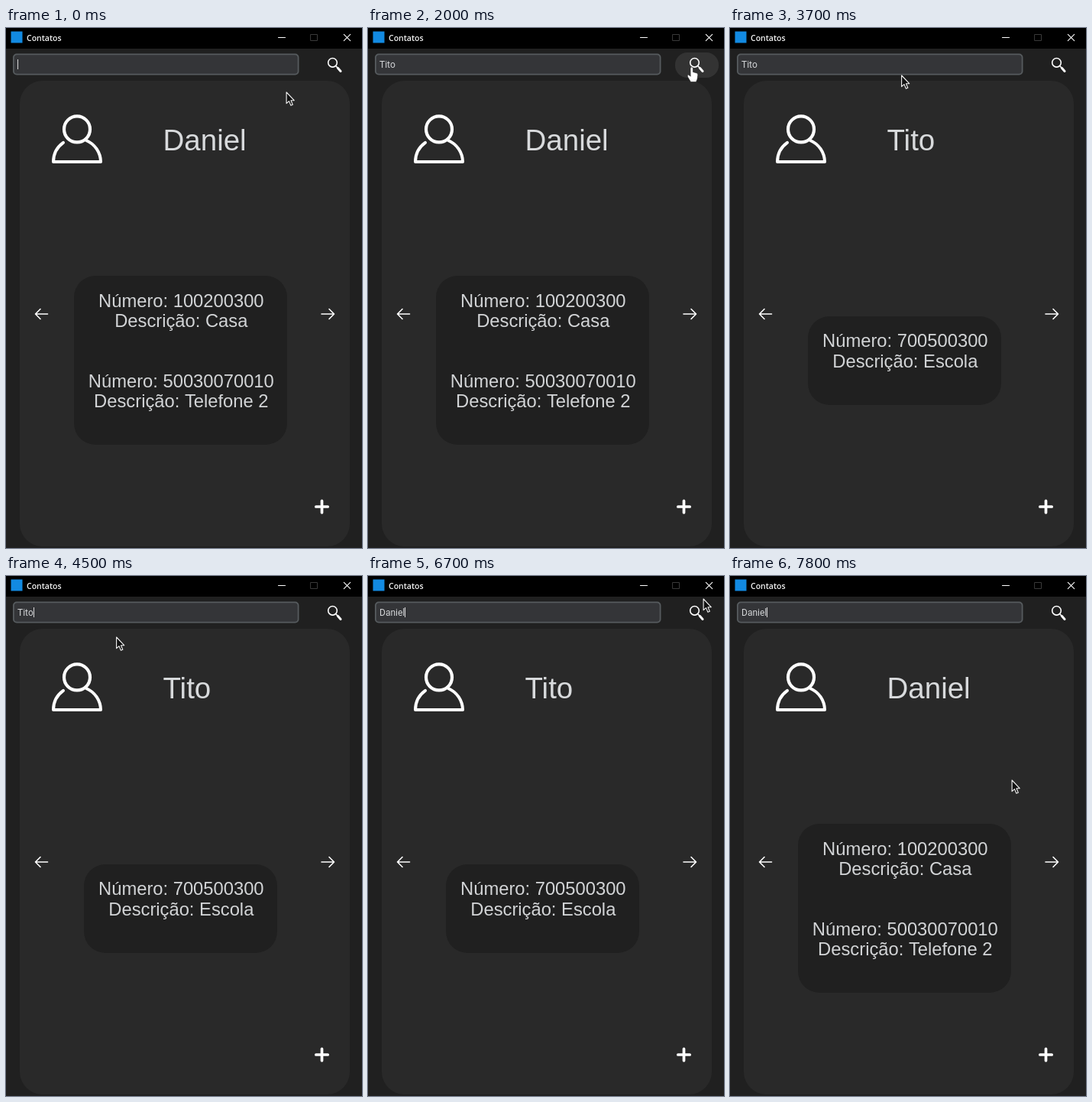
Animation, 466 px wide and 680 px high, one loop 8000 ms. Source, as an HTML page with a canvas:

```html
<!DOCTYPE html>
<html lang="pt">
<head>
<meta charset="utf-8">
<title>Contatos</title>
<style>
html, body { margin: 0; width: 100%; height: 100%; overflow: hidden; background: #202020; }
canvas { display: block; }
</style>
</head>
<body>
<canvas id="stage" width="466" height="680"></canvas>
<script>
const ctx = document.getElementById('stage').getContext('2d');
const LOOP = 8000;
const SANS = '"Liberation Sans", Arial, sans-serif';

const daniel = {
  name: 'Daniel', box: [89, 324, 279, 221], top: 364.6,
  phones: [['100200300', 'Casa'], ['50030070010', 'Telefone 2']]
};
const tito = {
  name: 'Tito', box: [102, 377, 253, 116], top: 417.2,
  phones: [['700500300', 'Escola']]
};

// [time, value]: the last entry reached is shown
const typing = [
  [0, ''], [300, 'T'], [700, 'Ti'], [1200, 'Tit'], [1400, 'Tito'],
  [4800, 'Tit'], [4860, 'Ti'], [4930, 'T'], [5000, ''],
  [5200, 'D'], [5300, 'Da'], [5600, 'Dan'], [5800, 'Dani'], [6000, 'Danie'], [6200, 'Daniel']
];
const contacts = [[0, daniel], [2200, tito], [7300, daniel]];

// [time, x, y] of the pointer tip
const path = [
  [0, 366, 83], [1300, 366, 83], [1800, 424, 51], [2600, 424, 51], [2900, 398, 84],
  [3600, 223.5, 61], [3900, 223.5, 61], [4500, 143.5, 79], [6500, 143.5, 79],
  [6700, 438, 29], [6900, 424, 51], [7400, 424, 51], [7800, 368, 266], [LOOP, 368, 266]
];

function current(list, t) {
  let value = list[0][1];
  for (const [at, v] of list) if (t >= at) value = v;
  return value;
}

function pointerAt(t) {
  const i = Math.max(1, path.findIndex(p => p[0] > t));
  const [t0, x0, y0] = path[i - 1], [t1, x1, y1] = path[i];
  const u = (t - t0) / (t1 - t0), k = u * u * (3 - 2 * u);
  return [x0 + (x1 - x0) * k, y0 + (y1 - y0) * k];
}

function panel(x, y, w, h, r, fill) {
  ctx.fillStyle = fill;
  ctx.beginPath();
  ctx.roundRect(x, y, w, h, r);
  ctx.fill();
}

function line(d, width, color = '#fff') {
  ctx.strokeStyle = color;
  ctx.lineWidth = width;
  ctx.stroke(new Path2D(d));
}

function circle(x, y, r, width) {
  ctx.strokeStyle = '#fff';
  ctx.lineWidth = width;
  ctx.beginPath();
  ctx.arc(x, y, r, 0, 2 * Math.PI);
  ctx.stroke();
}

function text(s, x, y, font, color, align = 'left') {
  ctx.font = font;
  ctx.fillStyle = color;
  ctx.textAlign = align;
  ctx.fillText(s, x, y);
}

function titleBar() {
  ctx.fillStyle = '#000';
  ctx.fillRect(0, 0, 466, 27);
  ctx.fillStyle = '#128ae2';
  ctx.fillRect(6.5, 4.5, 15, 15);
  text('Contatos', 27, 17, '600 10.5px "Open Sans", "Noto Sans", sans-serif', '#f2f2f2');
  line('M356.5 12.5H365.5', 1.1);
  line('M399 8.5H407.5V16.5H399Z', 1, '#3a3a3a');
  line('M442.3 8.3L450.7 16.7M450.7 8.3L442.3 16.7', 1.1);
}

function searchBar(t, hover) {
  panel(9, 33.5, 374.5, 28, 5, '#565b5e');
  panel(10.8, 35.2, 370.9, 24.6, 3.5, '#343538');
  const typed = current(typing, t);
  text(typed, 15, 51.5, '12px Roboto, sans-serif', '#d2d4d6');
  // caret: 600 ms on, 300 ms off
  if ((t + 500) % 900 < 600) {
    const w = ctx.measureText(typed).width;
    ctx.fillStyle = '#d8d8d8';
    ctx.fillRect(Math.round(15 + w), 41, 1, 13);
  }
  if (hover) panel(402, 32, 57, 33, 16, '#333');
  circle(427.5, 45.3, 5.8, 1.6);
  line('M431.6 49.5L434 52', 1.6);
  line('M434.3 52.3L438 56.5', 3);
}

function card(c) {
  panel(18, 69, 432, 609, 30, '#292929');
  circle(93, 132.4, 17, 4.2);
  line('M75 149.8A31 31 0 0 0 62 175H124A31 31 0 0 0 105 147', 4);
  text(c.name, 205.5, 160, '38.5px ' + SANS, '#d8dadc');

  panel(...c.box, 28, '#202020');
  c.phones.forEach(([number, label], i) => {
    const y = c.top + i * 105.4, font = '23.75px ' + SANS;
    text('Número: ' + number, 229.3, y, font, '#d2d4d6', 'center');
    text('Descrição: ' + label, 229.3, y + 26.4, font, '#d2d4d6', 'center');
  });

  line('M54.5 374H38.5M45 367.5L38.5 374L45 380.5', 1.6);
  line('M413 374H429.5M423 367.5L429.5 374L423 380.5', 1.6);
  line('M405.8 626H421.2M413.5 618.3V633.7', 3.7);
}

function pointer(x, y, hand) {
  ctx.save();
  ctx.translate(x, y);
  if (hand) {
    const shape = new Path2D('M-2 2Q-2 0 -.3 0Q1.4 0 1.4 2V6.5L6.5 8Q8 8.5 7.8 10.5L7 16L5.5 19.5H-1.5L-5.5 13Q-6.5 10.5 -4.5 10.2L-2 12Z');
    ctx.fillStyle = '#fff';
    ctx.fill(shape);
    ctx.strokeStyle = '#222';
    ctx.lineWidth = .6;
    ctx.stroke(shape);
  } else {
    ctx.translate(.6, .2);
    const shape = new Path2D('M.5 .8V15.5L3.9 12.4L6.3 18L8.7 17L6.4 11.5H10.6Z');
    ctx.fillStyle = '#111';
    ctx.fill(shape);
    ctx.strokeStyle = '#f4f4f4';
    ctx.lineWidth = 1.1;
    ctx.stroke(shape);
  }
  ctx.restore();
}

function draw(t) {
  const [x, y] = pointerAt(t);
  const hover = x > 402 && x < 459 && y > 32 && y < 65;
  ctx.lineCap = ctx.lineJoin = 'round';
  ctx.fillStyle = '#202020';
  ctx.fillRect(0, 0, 466, 680);
  titleBar();
  searchBar(t, hover);
  card(current(contacts, t));
  pointer(x, y, hover);
}

const start = performance.now();
function tick() {
  draw((performance.now() - start) % LOOP);
  requestAnimationFrame(tick);
}
tick();
</script>
</body>
</html>
```
